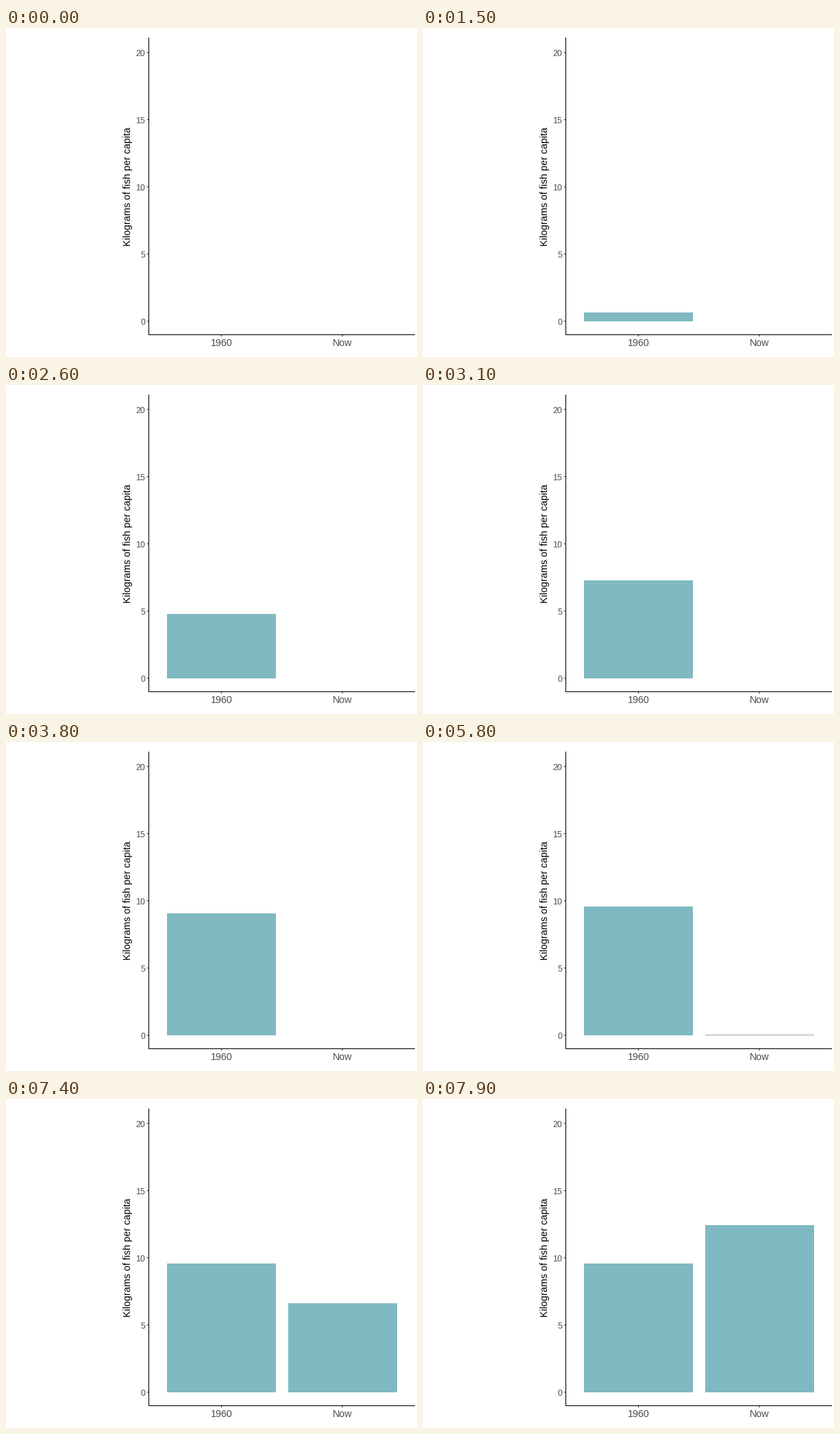
A matplotlib script for the animation above (8 s loop, 600 by 480 pixels).

```python
import matplotlib.pyplot as plt
from matplotlib.animation import FuncAnimation
from matplotlib.patches import Rectangle

W, H = 600, 480
STEP = 100          # ms per picture
LOOP = 8000         # ms
GROW = 4600         # ms a bar takes to reach its value

LEFT, RIGHT, TOP, BOTTOM = 208.5, 597, 14, 447.5
TEAL, HAIRLINE = "#80b9c1", "#a0a6a8"
SMALL, LARGE = 12.4, 14.25

# label, value in kg, start of growth in ms
BARS = [("1960", 9.6, 300), ("Now", 20.1, 5400)]

plt.rcParams["font.family"] = "Liberation Sans"

peak = max(value for _, value, _ in BARS)
unit = (BOTTOM - TOP) / (1.1 * peak)        # 5 % padding on both ends
slot = (RIGHT - LEFT) / (len(BARS) + 0.2)


def y_of(kg):
    return BOTTOM - (kg + 0.05 * peak) * unit


def x_of(i):
    return LEFT + (0.6 + i) * slot


def ease(p):
    p = min(max(p, 0), 1)
    return 4 * p ** 3 if p < 0.5 else 1 - 4 * (1 - p) ** 3


fig = plt.figure(figsize=(W / 72, H / 72), dpi=72, facecolor="white")
ax = fig.add_axes([0, 0, 1, 1])
ax.set(xlim=(0, W), ylim=(H, 0))
ax.axis("off")


def line(xs, ys, color, z=3):
    ax.plot(xs, ys, color=color, lw=1.07, solid_capstyle="butt",
            snap=False, zorder=z)


def label(x, y, text, size, color="#4d4d4d", **kw):
    ax.text(x, y, text, size=size, color=color, va="baseline", **kw)


line([LEFT, LEFT], [TOP, BOTTOM + 0.5], "black", 4)
line([LEFT - 0.5, RIGHT], [BOTTOM, BOTTOM], "black", 4)

for kg in range(0, 21, 5):
    y = y_of(kg)
    line([LEFT - 2.75, LEFT], [y, y], "#333333")
    label(203, round(y + 5), str(kg), SMALL, ha="right")

base = round(y_of(0))
rects = []
for i, (name, _, _) in enumerate(BARS):
    x = x_of(i)
    line([x, x], [BOTTOM, BOTTOM + 2.75], "#333333")
    label(x, 464, name, LARGE, ha="center")
    x0, x1 = round(x - 0.45 * slot), round(x + 0.45 * slot)
    rects.append(ax.add_patch(
        Rectangle((x0, base), x1 - x0, 0, lw=0, antialiased=False)))

label(182, (TOP + BOTTOM) / 2, "Kilograms of fish per capita", LARGE, "black",
      ha="center", rotation=90, rotation_mode="anchor")


def update(n):
    t = n * STEP
    for rect, (_, value, start) in zip(rects, BARS):
        h = round(value * unit * ease((t - start) / GROW))
        rect.set_y(base - h)
        rect.set_height(h)
        rect.set_visible(h > 0)
        rect.set_facecolor(HAIRLINE if h == 1 else TEAL)
    return rects


anim = FuncAnimation(fig, update, frames=LOOP // STEP, interval=STEP,
                     init_func=lambda: update(0), repeat=True, repeat_delay=0)
plt.show()
```
